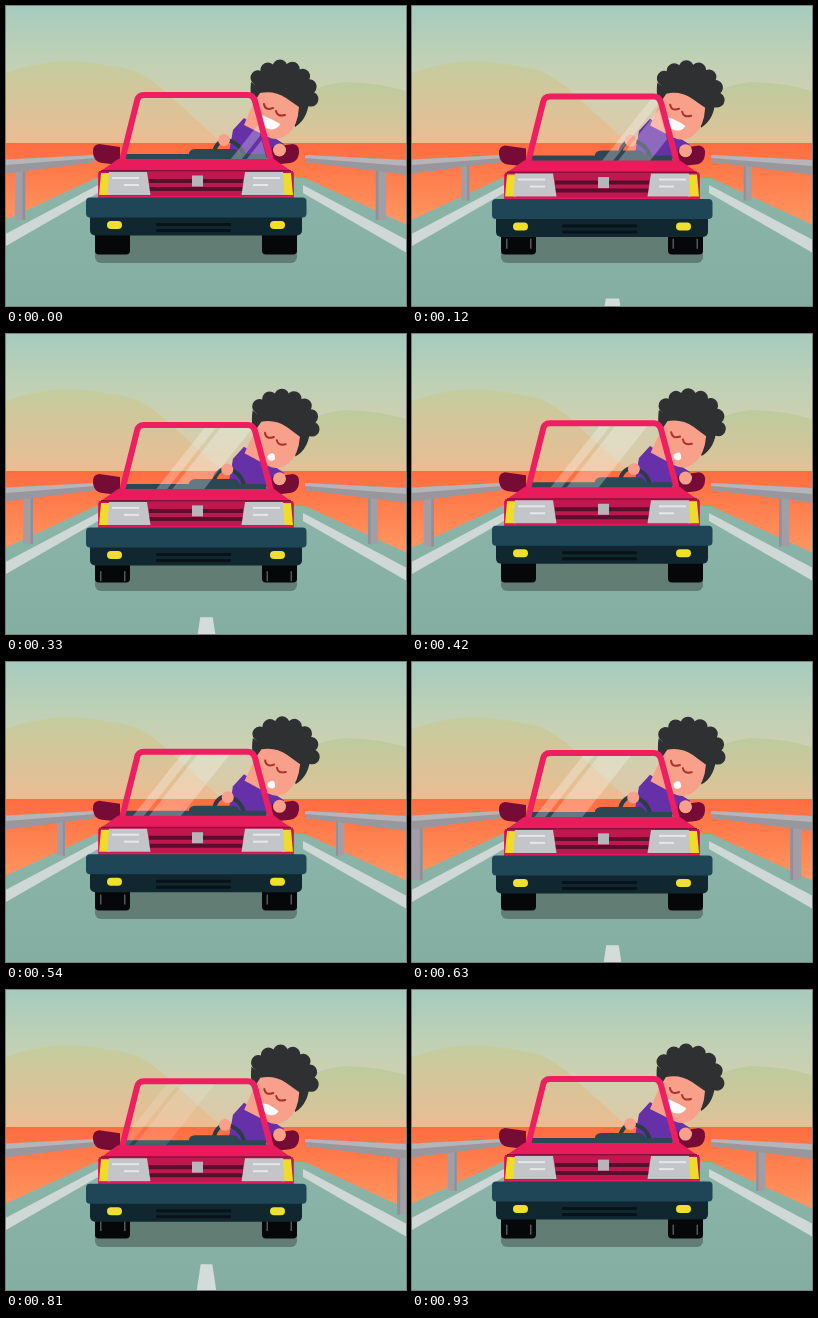
Recreate the animation shown at these times as an HTML page with a canvas. Size 400 px wide and 300 px high, loop 960 ms.

```html
<!DOCTYPE html>
<html>
<head>
<meta charset="utf-8">
<style>
html, body { margin: 0; width: 100%; height: 100%; overflow: hidden; }
canvas { display: block; }
</style>
</head>
<body>
<canvas id="stage" width="400" height="300"></canvas>
<script>
const c = document.getElementById('stage').getContext('2d');
const LOOP = 960, STEP = 30, TICKS = 31, TAU = Math.PI * 2;
const ROAD = 194.5, CAR = 190; // mirror axes
const SKIN = '#f9a08b';

const clamp = v => Math.max(0, Math.min(1, v));

function shape(d, fill, stroke, width) {
  const path = new Path2D(d);
  if (fill) { c.fillStyle = fill; c.fill(path); }
  if (stroke) { c.strokeStyle = stroke; c.lineWidth = width; c.stroke(path); }
}
function box(color, x, y, w, h, r = 0) {
  c.fillStyle = color;
  c.beginPath();
  c.roundRect(x, y, w, h, r);
  c.fill();
}
function dot(color, x, y, r) {
  box(color, x - r, y - r, 2 * r, 2 * r, r);
}
function fade(y0, y1, ...colors) {
  const g = c.createLinearGradient(0, y0, 0, y1);
  colors.forEach((col, i) => g.addColorStop(i / (colors.length - 1), col));
  return g;
}
function group(draw) {
  c.save();
  draw();
  c.restore();
}
function mirrored(axis, draw) {
  draw();
  group(() => { c.translate(2 * axis, 0); c.scale(-1, 1); draw(); });
}
function slant(x, w, y0, y1, lean) {
  shape(`M${x} ${y1}h${w}L${x + w + lean} ${y0}h${-w}Z`, '#fff');
}

function scenery() {
  box(fade(0, 137, '#a5cbbf', '#bdd0b6', '#d0d0b0', '#dfc8a5'), 0, 0, 400, 137);
  shape('M255 137Q285 95 303 86Q322 77 340 76Q375 77 400 85V137Z', fade(76, 137, '#bccb9f', '#e0c398'));
  shape('M0 137V67Q30 56 60 55Q95 56 132 66L152 79L216 137Z', fade(55, 137, '#c3cd9f', '#ecbc92'));
  box(fade(137, 215, '#ff6c40', '#ff9560'), 0, 137, 400, 85);
  shape('M-12 219L90 172H299L401 219V300H-12Z', fade(170, 300, '#8ab5a8', '#84aea2'));
  mirrored(ROAD, () => shape('M-12 234L92 179V187L-12 247Z', '#cfd8d5'));
}

function guardRails(passed) {
  for (let k = -1; k < 1; k++) {
    const d = 1 / (0.005714 - 0.00284 * (passed % 1 + k));
    if (d < 127) continue;
    const w = d * 0.06, x = 2 * ROAD - 200 - d;
    mirrored(ROAD, () => {
      box('#a19fa5', x - w / 2, 156, w, d * 0.49 - 28);
      box('#918f97', x + w / 4, 156, w / 4, d * 0.49 - 28);
    });
  }
  mirrored(ROAD, () => {
    shape('M-12 154L90 149V156L-12 169Z', '#98979e');
    shape('M-12 154L90 149V152L-12 160Z', '#b5b4b9');
  });
}

function hairAndFace(smile) {
  const hair = '#2f3032';
  c.lineCap = 'round';
  dot(hair, 272, 84, 23);
  // Tufts fan out around the head
  for (let i = 0; i < 7; i++) {
    const a = (-140 + 24 * i) * TAU / 360;
    shape(`M274 90L${275 + 30 * Math.cos(a)} ${91 + 30 * Math.sin(a)}`, null, hair, 15);
  }
  shape('M245 76Q243 95 250 102L265 90ZM303 92Q303 112 289 121L284 96Z', hair);
  shape('M254 87Q268 84 280 92L293 101Q292 120 282 128Q272 136 262 131L238 119L247 98Z', SKIN);
  shape('M258 98Q259 105 267 102M270 105Q271 111 279 109', null, '#a8322d', 2);
  group(() => {
    const rest = 1 - smile, w = 4 + 7 * smile, drop = 5 + 5 * smile;
    const top = -3 * smile * smile, arch = -4 - 4 * rest * rest;
    c.translate(263 + 2 * rest, 116 + 6 * rest);
    c.rotate(0.45);
    shape(`M${-w} ${top}Q0 ${arch} ${w} ${top}C${w} ${drop} ${-w} ${drop} ${-w} ${top}Z`, '#fff');
  });
}

function driver(smile, sway) {
  shape('M222 152L227 124L238 112L278 138L271 152Z', '#6530a8');
  shape('M207 151Q209 135 220 134Q234 136 238 150', null, '#2c3c47', 4);
  dot(SKIN, 218 + sway * 4, 134 + sway, 6);
  group(() => {
    c.translate(255, 140);
    c.rotate(sway * 0.03);
    c.translate(-255, -140);
    hairAndFace(smile);
  });
}

function glass(progress) {
  group(() => {
    c.clip(new Path2D('M136 91H244L261 154H118Z'));
    box('#2d4654', 115, 148, 150, 7);
    shape('M183 154V147Q184 143 190 143H228Q234 144 236 154Z', '#2d4654');
    c.globalAlpha = 0.27 * clamp(5 * (0.94 - progress));
    const x = 94 + 130 * Math.exp(-2.4 * progress);
    slant(x, 11, 91, 154, 50);
    slant(x + 16, 32, 91, 154, 50);
  });
}

function headlight() {
  shape('M95 167H104V189H93Z', '#f0dc28');
  shape('M103 166H141L144.5 189H101.5Z', '#c4c5c8');
  box('#e6e7e8', 106, 171, 27, 2);
  box('#e6e7e8', 118, 178, 15, 2);
}

function wheels(phase) {
  box('#617d74', 89, 226, 202, 31, 6);
  mirrored(CAR, () => {
    box('#050709', 89, 222, 35, 26.5, 4);
    if (phase > 0.15 && phase < 0.95)
      [5, 29].forEach(o => box('#55595b', 89 + o, 229 + 9 * phase, 1.5, 10));
  });
}

function carBody() {
  mirrored(CAR, () => shape('M114 141L93 138Q86 139 87 147Q88 156 96 157L114 159Z', '#760b36'));
  c.lineJoin = 'round';
  shape('M116 155L131 95Q132 89 138 89H242Q247 89 249 95L265 155', null, '#ee1f60', 6);
  shape('M112 153H268L288 167V193H92V167Z', '#e81b5c');
  box('#be184e', 93, 165, 194, 25);
  box('#8a1040', 95, 164, 190, 1.5);
  [173, 181].forEach(y => box('#5a0d2d', 143, y, 94, 4));
  box('#b5b5ba', 186, 169.5, 11, 11);
  mirrored(CAR, headlight);
  box('#11272f', 84, 205, 212, 24.5, 5);
  box('#1e4657', 80, 191.5, 220.5, 20, 4);
  mirrored(CAR, () => box('#f0df2c', 101, 215, 15, 8, 4));
  [217, 223].forEach(y => box('#071318', 150, y, 75, 3, 1));
}

function dash(turn) {
  const top = 295 + 47 * Math.cos(2 * turn);
  if (top > 300) return;
  const half = 4.5 + (top - 248) * 0.05, base = half + (300 - top) * 0.15;
  shape(`M${200.5 - half} ${top}h${2 * half}L${200.5 + base} 300h${-2 * base}Z`, '#d3dcd8');
}

function draw(step) {
  const tick = step > 18 ? step - 1 : step; // the motion pauses for one step
  const progress = tick / TICKS, turn = TAU * progress;
  const passed = 11 * progress;
  const bounce = 1.5 * (1 - Math.cos(2 * turn));
  const lift = bounce * 0.4;
  scenery();
  guardRails(passed);
  wheels(passed % 1);
  dash(turn);
  group(() => {
    c.translate(0, lift);
    driver(clamp(0.3 + 0.8 * Math.cos(turn)), (1 - Math.cos(turn)) / 2);
  });
  group(() => {
    c.translate(0, bounce);
    glass(progress);
    carBody();
  });
  dot(SKIN, 273.5, 144 + lift, 6.5);
}

function frame() {
  draw(Math.floor(performance.now() % LOOP / STEP));
  requestAnimationFrame(frame);
}
frame();
</script>
</body>
</html>
```
